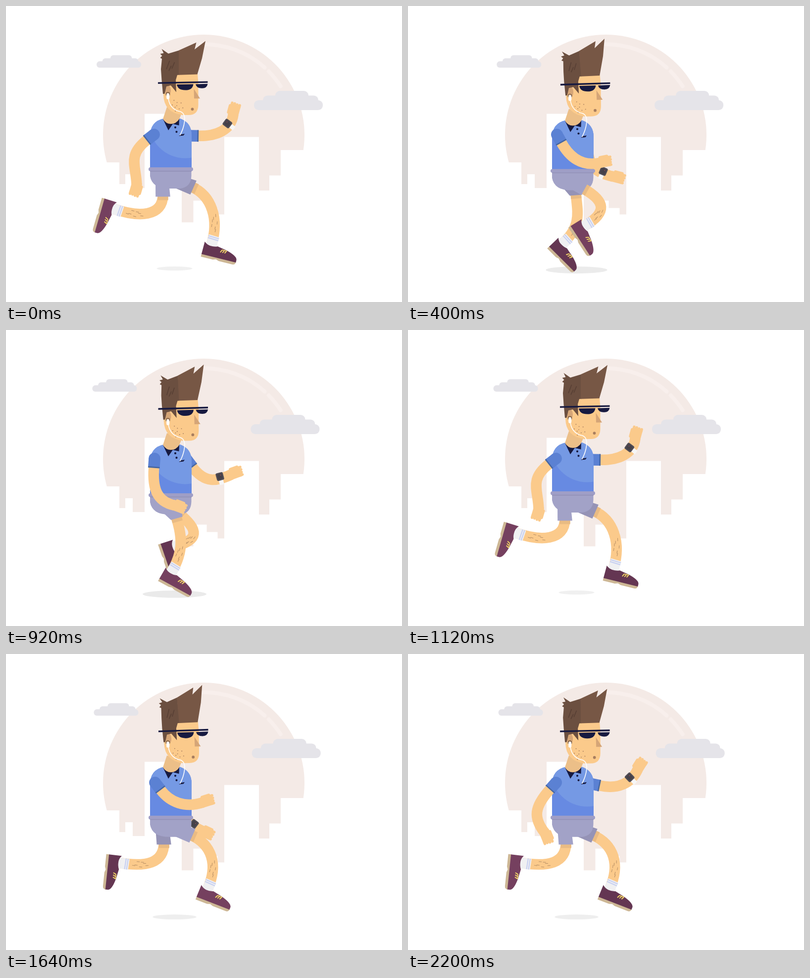
An HTML page with a canvas that plays this animation: 800x600 px, repeating every 2.24 s.

```html
<!DOCTYPE html>
<html lang="en">
<head>
<meta charset="utf-8">
<title>Runner</title>
<style>
  html, body { margin: 0; width: 100%; height: 100%; overflow: hidden; background: #fff; }
  canvas { display: block; }
</style>
</head>
<body>
<canvas id="stage" width="800" height="600"></canvas>
<script>
const ctx = document.getElementById('stage').getContext('2d');
const LOOP = 2240, CYCLE = 1120, STEP = 560, TICK = 40;
const RAD = Math.PI / 180, TURN = 2 * Math.PI;

const C = {
  dome: '#f4eae6', shine: '#f8efec', cloud: '#e5e4e9',
  skin: '#fbca8b', skinShade: '#e9bb83', neck: '#ecbf88', ear: '#d5a577', mouth: '#a87e5f',
  hair: '#6b4f40', hairLight: '#775745', hairLine: '#563e33', navy: '#171a40',
  shirt: '#7599e4', shirtLow: '#678ae2', sleeve: '#5b81d3', cuff: '#4767a0',
  shorts: '#a2a2c7', shortsFar: '#9593b6', belt: '#9f9ec6', beltLine: '#908fb5',
  shoe: '#75405f', shoeFar: '#643652', sole: '#cdb795', lace: '#f6dc68',
  sock: '#f0f0f2', stripe: '#c8d0f1', watch: '#514d55'
};

// Path of the ankle over one cycle: time, x, y, foot angle
const ANKLE = [
  [0, 415, 484, 14], [200, 381, 496, 14], [280, 371, 498, 2.5], [400, 312, 482, 45],
  [560, 217, 411, 106], [740, 286, 426, 95], [840, 306, 432, 97], [960, 356, 446, 57]
];

// Shoulder with its drift, sleeve angle with its turn, upper arm length with its
// growth, bend at the wrist, and the path of the wrist: swing, x, y, hand angle
const NEAR_ARM = {
  x: 299, drift: 2, y: 260.5, sleeve: 142, turn: -90, upper: 50, grow: -18, fore: 38, bend: 18,
  wrist: [[0, 264, 362, 106], [0.112, 276, 362, 68], [0.707, 366, 347, 4], [1, 398, 300, -18]]
};
const FAR_ARM = {
  x: 370, drift: -9, y: 263, sleeve: 1, turn: 97, upper: 36, grow: 14, fore: 32, bend: 8,
  wrist: [[0, 459, 220, -75], [0.112, 464, 234, -58], [0.707, 445, 318, -5], [1, 396, 360, 25]]
};

// Smooth curve through the keys; wraps when a period is given.
function sample(keys, t, period) {
  const n = keys.length;
  let i = 0;
  while (i < n - 1 && keys[i + 1][0] <= t) i++;
  if (!period) i = Math.min(i, n - 2);
  const key = j => {
    if (!period) return keys[Math.max(0, Math.min(n - 1, j))];
    const k = keys[(j + n) % n], shift = j < 0 ? -period : j >= n ? period : 0;
    return [k[0] + shift, ...k.slice(1)];
  };
  const [a, b, c, d] = [-1, 0, 1, 2].map(o => key(i + o));
  const h = c[0] - b[0], u = (t - b[0]) / h, u2 = u * u, u3 = u2 * u;
  return b.slice(1).map((p, m) => {
    const j = m + 1, q = c[j];
    const v0 = (q - a[j]) / (c[0] - a[0]), v1 = (d[j] - p) / (d[0] - b[0]);
    return (2 * u3 - 3 * u2 + 1) * p + (u3 - 2 * u2 + u) * h * v0 +
      (3 * u2 - 2 * u3) * q + (u3 - u2) * h * v1;
  });
}

function fill(path, color) {
  ctx.fillStyle = color;
  ctx.fill(typeof path === 'string' ? new Path2D(path) : path);
}
function stroke(path, color, width, cap = 'butt') {
  ctx.strokeStyle = color;
  ctx.lineWidth = width;
  ctx.lineCap = cap;
  ctx.stroke(typeof path === 'string' ? new Path2D(path) : path);
}
function poly(points, color) {
  fill('M' + points.map(p => p.join()).join('L') + 'Z', color);
}
function box(x, y, w, h, r, color) {
  const p = new Path2D();
  p.roundRect(x, y, w, h, r);
  fill(p, color);
}
function arc(x, y, r, from = 0, to = TURN) {
  const p = new Path2D();
  p.arc(x, y, r, from, to);
  return p;
}
function dot(x, y, r, color) {
  fill(arc(x, y, r), color);
}
function oval(x, y, rx, ry, color) {
  const p = new Path2D();
  p.ellipse(x, y, rx, ry, 0, 0, TURN);
  fill(p, color);
}
function at(x, y, angle, draw) {
  ctx.save();
  ctx.translate(x, y);
  ctx.rotate(angle);
  draw();
  ctx.restore();
}
function clipped(path, draw) {
  ctx.save();
  ctx.clip(path);
  draw();
  ctx.restore();
}
const move = ([x, y], angle, len) =>
  [x + len * Math.cos(angle * RAD), y + len * Math.sin(angle * RAD)];

// A limb is a cubic curve set by its two ends and the direction at each.
function makeLimb(from, angle, len, to, endAngle, endLen) {
  return [from, move(from, angle, len), move(to, endAngle, -endLen), to];
}
function along([a, b, c, d], t) {
  const s = 1 - t;
  const mix = i => s * s * s * a[i] + 3 * s * s * t * b[i] + 3 * s * t * t * c[i] + t * t * t * d[i];
  const slope = i => s * s * (b[i] - a[i]) + 2 * s * t * (c[i] - b[i]) + t * t * (d[i] - c[i]);
  return [mix(0), mix(1), Math.atan2(slope(1), slope(0))];
}
function strokeLimb([a, b, c, d]) {
  stroke(`M${a}C${b},${c},${d}`, C.skin, 21.5);
}

function drawCity() {
  // Each step of the skyline: right edge, bottom
  const skyline = [[229, 317], [241, 361], [256, 341], [280, 369], [330, 218.5], [355, 300],
    [378.5, 438.5], [405.5, 394.5], [427.5, 409.5], [441, 422.5], [511, 265.5], [532, 374],
    [555, 343.5], [610, 292]];
  const town = new Path2D();
  let left = 190;
  for (const [right, bottom] of skyline) {
    town.rect(left, 50, right - left, bottom - 50);
    left = right;
  }
  clipped(town, () => dot(399.5, 261.5, 203.5, C.dome));
  for (const [from, to] of [[-92, -48], [-44.5, -32.5]])
    stroke(arc(399.5, 261.5, 184, from * RAD, to * RAD), C.shine, 8, 'round');
}

function drawCloud(x, y, scale) {
  for (const [dx, dy, w] of [[43, 0, 67], [18, 9.5, 112], [0, 19, 139]])
    box(x + dx * scale, y + dy * scale, w * scale, 20 * scale, 9.3 * scale, C.cloud);
}

function drawShadow(phase) {
  const r = 36 + 29 * Math.sin(Math.PI * Math.pow(phase, 1.3));
  const ry = r * 0.114, tone = Math.round(247 - r * 0.2);
  oval(340.5, 528 + ry, r, ry, `rgb(${tone},${tone},${tone})`);
}

function drawHand(x, y, angle) {
  at(x, y, angle * RAD, () => {
    box(-5, -10.5, 27, 21, 2, C.skin);
    box(-1, -13.5, 20, 10, 3, C.skin);
    for (let f = 0; f < 4; f++) box(14, -10.6 + 5.3 * f, f < 2 ? 11 : 10, 5.2, 2.3, C.skin);
  });
}

function drawWatch([x, y, angle]) {
  at(x, y, angle, () => {
    box(-4.5, 2, 9, 10.5, 1, '#f6f6f6');
    box(-7.5, -12.5, 15, 16, 3, C.watch);
    box(-5, -10, 10, 11, 2, '#454149');
    dot(2, -7, 0.8, '#b65463');
  });
}

function drawArm(arm, swing, watch) {
  const len = 18.5, sleeve = arm.sleeve + arm.turn * swing;
  const shoulder = [arm.x + arm.drift * swing, arm.y];
  const [x, y, hand] = sample(arm.wrist, swing);
  const limb = makeLimb(move(shoulder, sleeve, len), sleeve, arm.upper + arm.grow * swing,
    [x, y], hand - arm.bend * (1 - swing), arm.fore);
  strokeLimb(limb);
  drawHand(x, y, hand);
  at(...shoulder, sleeve * RAD, () => {
    dot(0, 0, 11.8, C.sleeve);
    box(0, -11.8, len, 23.6, 0, C.sleeve);
    box(len - 2, -11.8, 2.6, 23.6, 0, C.cuff);
  });
  if (watch) drawWatch(along(limb, 0.74));
}

function drawFoot(x, y, angle, color) {
  at(x, y, angle * RAD, () => {
    fill('M-15,22H56.5Q56.5,28.5 50,28.5H22L16,26.5L10,28.5H-15Z', C.sole);
    fill('M-14.5,-3Q-9,2 -2,2.5Q7,3 13,0L33,4Q56,10 56.5,18V23H-15Z', color);
    for (const i of [0, 4.5, 9]) stroke(`M${21 + i},10.5L${24 + i},4.5`, C.lace, 1.9);
    stroke('M24,4.8H33', C.lace, 1.4);
  });
}

function drawShorts([x, y], angle, color, bob) {
  const end = move([x, y], angle, 4);
  const half = 12 + 0.1 * Math.abs(end[0] - 345);
  const hinge = Math.max(328, Math.min(366, end[0] + 10));
  at(...end, angle * RAD, () => box(-4, -10.75, 11, 21.5, 0, C.skinShade));
  poly([[302, 352 + bob], move(end, angle + 90, half), move(end, angle - 90, half),
    [hinge, 348 + bob]], color);
}

function drawLeg(time, shoe, shorts, bob) {
  const t = time % CYCLE, turn = TURN * t / CYCLE, reach = Math.cos(turn);
  const hip = [346 + 29 * reach ** 3, 374.5 - 8 * reach];
  const lean = 1.6 * Math.cos(TURN * (t - 20) / CYCLE);
  const thigh = 57 - 33 * Math.max(-1, Math.min(1, lean));
  const [x, y, foot] = sample(ANKLE, t, CYCLE);
  const limb = makeLimb(hip, thigh, 45 - 11 * Math.sin(turn), [x, y], foot + 93, 54);
  strokeLimb(limb);

  for (let i = 0; i < 7; i++) {
    const off = 6 * Math.sin(2.4 * i + 4);
    at(...along(limb, 0.6 + 0.035 * i), () => stroke(`M-3,${off}L3,${off + 0.8}`, '#b58d64', 1));
  }
  at(...along(limb, 1), () => {
    box(-19, -11, 22, 22, 1, C.sock);
    for (const s of [-17, -13]) box(s, -11, 2.2, 22, 0, C.stripe);
  });
  drawFoot(x, y, foot, shoe);
  drawShorts(hip, thigh, shorts, bob);
}

function drawPelvis() {
  fill('M291,332V345Q293,357 303,364Q312,370 331,370H352Q374,367 374.5,344V332Z', C.shorts);
}

function drawTorso() {
  const body = new Path2D('M291,330V264Q291,234 319,228H351Q375,236 375,262V330Z');
  fill(body, C.shirtLow);
  clipped(body, () => dot(362, 235, 73.5, C.shirt));
  box(288, 327, 90, 7.5, 3.7, C.belt);
  stroke('M291,334.6H375', C.beltLine, 1.4);
  fill('M317.5,230L328,252L337,239L349.5,242L350,229Z', C.navy);
  fill('M325,205L317,229Q323,239 333,239Q344,239 350,229L356,215Z', C.neck);
  dot(342, 246, 2.1, C.navy);
  dot(344.5, 255, 2.1, C.navy);
  fill('M349.5,263.5L352,260.5L361,259L358.5,262.5Z', C.navy);
}

function drawHair(swing) {
  const a = -6.6 * RAD * swing, c = Math.cos(a), s = Math.sin(a);
  // Only the upper hair sways.
  const sway = ([x, y]) => {
    if (y > 130) return [x, y];
    const dx = x - 330, dy = y - 124;
    return [330 + dx * c - dy * s, 124 + dx * s + dy * c];
  };
  poly([[349.5, 90], [328, 96.5], [314.5, 87], [318.5, 95.5], [311.5, 97], [315.5, 101], [311.5, 105],
    [315, 107], [313, 128], [314.5, 150], [317, 178], [320.5, 178], [324, 163],
    [333, 161], [344, 174.5], [343, 150], [346, 140], [350, 139.5]].map(sway), C.hair);
  poly([[349, 90], [384.5, 74], [381, 88], [403, 71], [396, 106], [386.5, 138.5],
    [349, 139.7]].map(sway), C.hairLight);
  for (const line of [[[330.5, 111], [324, 128]], [[334, 121], [329, 131]], [[340.5, 114], [335, 127]]])
    stroke('M' + line.map(sway).join('L'), C.hairLine, 1.5);
}

function drawFace() {
  fill('M325,137H387L388.5,156V200Q388.5,221 369,221H356Q319,216 318,180V150Z', C.skin);
  oval(327, 171, 6, 10.5, C.ear);
  fill('M379.5,168L392,187.5H380Z', C.ear);
  dot(376.5, 209, 2.9, C.mouth);
  for (let i = 0; i < 9; i++) dot(...move([345, 202], 137.5 * i, 4.6 * Math.sqrt(i)), 0.95, C.mouth);
}

function drawGlasses() {
  stroke('M307,156L407.5,154', C.navy, 3.4);
  fill('M345,159L378.5,158.3Q377,170.5 362,170.5Q347,170.5 345,159Z', C.navy);
  fill('M383,158.3L407.5,157.7Q406,166.7 396,166.7Q385,166.7 383,158.3Z', C.navy);
}

function drawHead(swing) {
  at(307 + swing, 156, -0.75 * RAD * swing, () => {
    ctx.translate(-307, -156);
    drawFace();
    drawHair(swing);
    drawGlasses();
  });
  stroke('M323.5,181Q322.5,175 327,175Q331.5,175 330.5,181', '#5d4738', 1.2);
  box(324.2, 177, 6, 12, 3, '#fff');
  stroke('M328,187C330,205 342,212 352,214C368,219 359,248 351.5,262', '#fff', 1.6);
}

function draw(t) {
  const swing = Math.sin(Math.PI * (t % CYCLE) / CYCLE);
  const bob = 1.8 - 2.2 * Math.cos(TURN * (t - 60) / STEP);
  const drift = 1 - Math.abs(1 - t / CYCLE);

  ctx.fillStyle = '#fff';
  ctx.fillRect(0, 0, 800, 600);
  drawCity();
  drawCloud(183 - 10.5 * drift, 99.8, 0.648);
  drawCloud(501 - 8 * drift, 172, 1);
  drawShadow(t % STEP / STEP);

  drawArm(FAR_ARM, swing, true);
  drawLeg(t, C.shoeFar, C.shortsFar, bob);
  at(0, bob, 0, drawPelvis);
  drawLeg(t + STEP, C.shoe, C.shorts, bob);
  at(0, bob, 0, () => {
    drawTorso();
    drawHead(swing);
  });
  drawArm(NEAR_ARM, swing, false);
}

const start = performance.now();
function frame() {
  const t = (performance.now() - start) % LOOP;
  draw(Math.floor(t / TICK) * TICK);
  requestAnimationFrame(frame);
}
frame();
</script>
</body>
</html>
```
